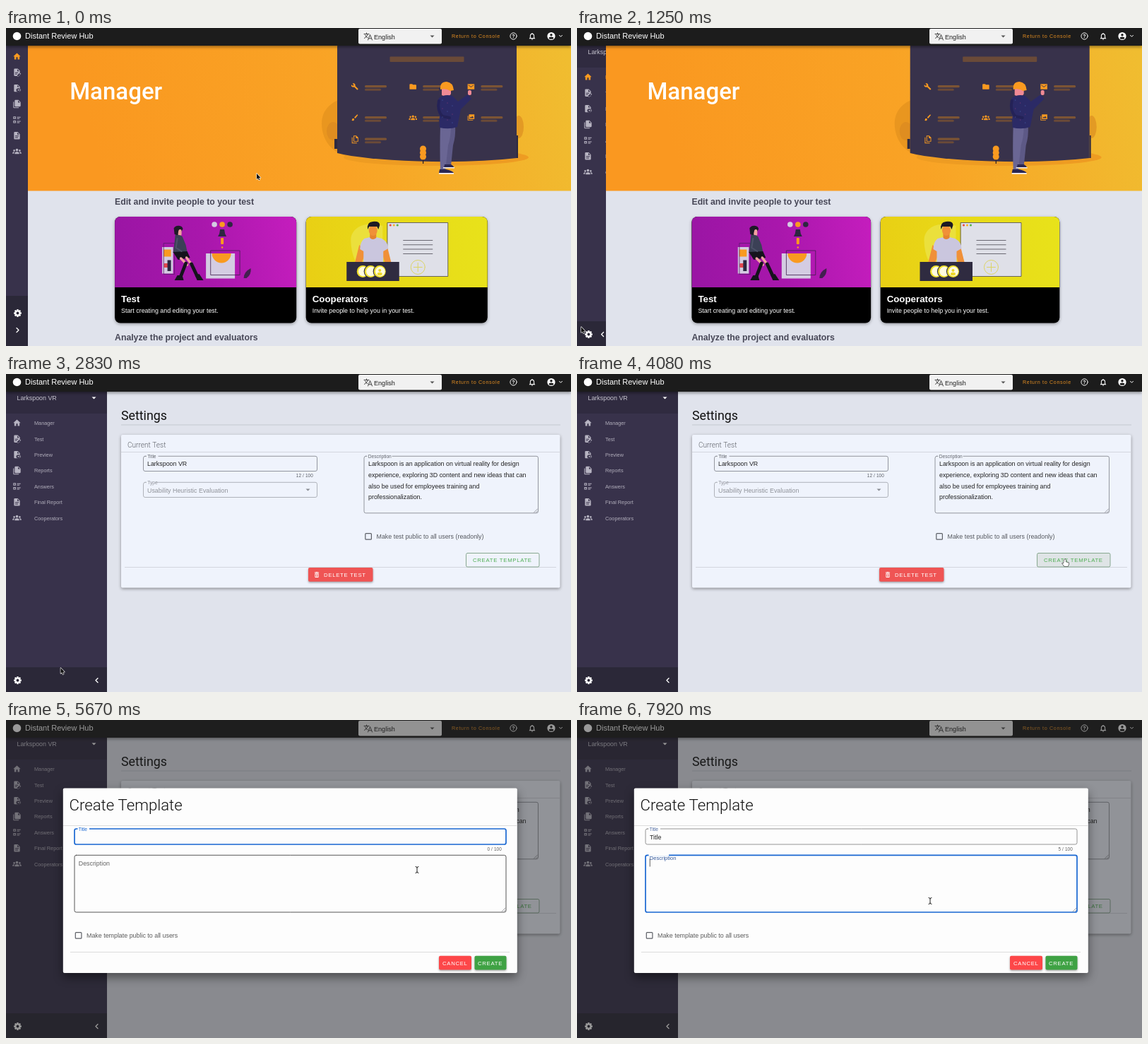
Recreate the animation shown at these times as an HTML page with a canvas. Size 800 by 450 pixels, loop 8 s.

```html
<!DOCTYPE html>
<html lang="en">
<head>
<meta charset="utf-8">
<title>Test manager walkthrough</title>
<style>
html, body { margin: 0; width: 100%; height: 100%; overflow: hidden; background: #e0e3ec; }
canvas { display: block; width: 800px; height: 450px; }
</style>
</head>
<body>
<canvas id="stage"></canvas>
<script>
const LOOP = 8000, STEP = 1000 / 12;
const SANS = '"Liberation Sans", Arial, sans-serif', ROBOTO = 'Roboto, sans-serif';
const ORANGE = '#f99a20', DARK = '#38324b', BLUE = '#1967d2', GREEN = '#3fa244';
const PRODUCT = 'Larkspoon VR';

const canvas = document.getElementById('stage');
const ctx = canvas.getContext('2d');
const dpr = window.devicePixelRatio || 1;
canvas.width = 800 * dpr;
canvas.height = 450 * dpr;

// ---------- helpers ----------
const clamp = v => Math.max(0, Math.min(1, v));
const mix = (a, b, p) => a + (b - a) * p;

function bezier(x1, y1, x2, y2) {
  const curve = (a, b, s) => 3 * (1 - s) * (1 - s) * s * a + 3 * (1 - s) * s * s * b + s * s * s;
  return u => {
    u = clamp(u);
    let lo = 0, hi = 1;
    for (let i = 0; i < 24; i++) {
      const mid = (lo + hi) / 2;
      if (curve(x1, x2, mid) < u) lo = mid; else hi = mid;
    }
    return curve(y1, y2, hi);
  };
}
const standard = bezier(.4, 0, .2, 1), swing = bezier(.25, .8, .5, 1), inOut = bezier(.42, 0, .58, 1);

function text(s, x, y, size, color, o = {}) {
  ctx.font = `${o.weight || 400} ${size}px ${o.font || SANS}`;
  ctx.letterSpacing = (o.space || 0) + 'px';
  ctx.textAlign = o.align || 'left';
  ctx.fillStyle = color;
  ctx.fillText(s, x, y + size * .355);
}
function box(x, y, w, h, color, r = 0) {
  ctx.fillStyle = color;
  ctx.beginPath();
  ctx.roundRect(x, y, w, h, r);
  ctx.fill();
}
function frame(x, y, w, h, color, lw = 1, r = 0) {
  ctx.strokeStyle = color;
  ctx.lineWidth = lw;
  ctx.beginPath();
  ctx.roundRect(x, y, w, h, r);
  ctx.stroke();
}
function disc(x, y, r, color, ry = r) {
  ctx.fillStyle = color;
  ctx.beginPath();
  ctx.ellipse(x, y, r, ry, 0, 0, 7);
  ctx.fill();
}
function ring(x, y, r, color, lw = 1) {
  ctx.strokeStyle = color;
  ctx.lineWidth = lw;
  ctx.beginPath();
  ctx.arc(x, y, r, 0, 7);
  ctx.stroke();
}
function shape(d, color) {
  ctx.fillStyle = color;
  ctx.fill(new Path2D(d), 'evenodd');
}
function stroke(d, color, lw = 1) {
  ctx.strokeStyle = color;
  ctx.lineWidth = lw;
  ctx.lineCap = ctx.lineJoin = 'round';
  ctx.stroke(new Path2D(d));
}
function group(fn) { ctx.save(); fn(); ctx.restore(); }
function shadow(color, blur, dy) {
  ctx.shadowColor = color;
  ctx.shadowBlur = blur * dpr;
  ctx.shadowOffsetY = dy * dpr;
}
function gradient(x1, y1, x2, y2, ...colors) {
  const g = ctx.createLinearGradient(x1, y1, x2, y2);
  colors.forEach((c, i) => g.addColorStop(i / (colors.length - 1), c));
  return g;
}

// ---------- icons on a 24 unit grid ----------
const SHEET = 'M6 2h8l6 6v12a2 2 0 0 1-2 2H6a2 2 0 0 1-2-2V4a2 2 0 0 1 2-2zM13 3.5V9h5.5z';
const ICONS = {
  home: 'M10 20v-6h4v6h5v-8h3L12 3 2 12h3v8z',
  edit: SHEET + 'M7 12h8v2H7zM7 16h5v2H7zM13 20l7-7 3 3-7 7h-3z',
  eye: SHEET + 'M10 17a5 4 0 0 1 12 0a5 4 0 0 1-12 0zM14 17a2 2 0 0 1 4 0a2 2 0 0 1-4 0z',
  stack: 'M8 1h8l6 6v10a2 2 0 0 1-2 2H8a2 2 0 0 1-2-2V3a2 2 0 0 1 2-2zM15 2.500V8h5.500zM2 6h2v15h13v2H4a2 2 0 0 1-2-2z',
  copies: 'M8 1h8l6 6v12H8zM10 3v14h10V9h-5V3zM3 6h2v16h13v2H3z',
  list: 'M2 3h7v7H2zM4 5v3h3V5zM2 14h7v7H2zM4 16v3h3v-3zM12 4h10v2H12zM12 8h7v2h-7zM12 15h10v2H12zM12 19h7v2h-7z',
  doc: SHEET + 'M7 12h10v2H7zM7 16h8v2H7z',
  people: 'M8.500 8a3.500 3.500 0 0 1 7 0a3.500 3.500 0 0 1-7 0zM6 19v-2c0-5 12-5 12 0v2zM2 9.500a2.500 2.500 0 0 1 5 0a2.500 2.500 0 0 1-5 0zM17 9.500a2.500 2.500 0 0 1 5 0a2.500 2.500 0 0 1-5 0zM0 18v-2c0-2 2-3 5-3q-1 1-1 5zM24 18v-2c0-2-2-3-5-3q1 1 1 5z',
  folder: 'M2 6a2 2 0 0 1 2-2h6l2 2h8a2 2 0 0 1 2 2v10a2 2 0 0 1-2 2H4a2 2 0 0 1-2-2z',
  mail: 'M2 4h20v16H2zM4 6l8 6 8-6v2l-8 6-8-6z',
  wrench: 'M22 19l-9-9c1-3 0-5-2-7-2-1-4-1-6 0l4 4-3 3-4-4c-1 2-1 4 1 6 2 2 4 2 7 1l9 9z',
  brush: 'M7 14c-2 0-3 1-3 3 0 1-1 2-2 2 3 3 8 2 8-2 0-2-1-3-3-3zM21 4l-2-2-9 9 3 3z',
  images: 'M6 2h16v14H6zM8 13h12l-4-6-3 4-2-2zM2 6h2v12h14v2H2z',
  bin: 'M6 8h12v11a2 2 0 0 1-2 2H8a2 2 0 0 1-2-2zM8 10v9h8v-9zM10 11h1.500v7H10zM13 11h1.500v7H13zM5 4h4l1-1h4l1 1h4v2H5z',
  bell: 'M10 20h4a2 2 0 0 1-4 0zM4 19v-1l2-2v-5c0-3 2-6 5-6V4q1-2 2 0v1c3 0 5 3 5 6v5l2 2v1zM8 17h8v-6c0-5-8-5-8 0z'
};
function icon(name, x, y, color, size = 12.5) {
  group(() => {
    ctx.translate(x - size / 2, y - size / 2);
    ctx.scale(size / 24, size / 24);
    shape(ICONS[name], color);
  });
}
function gear(x, y) {
  group(() => {
    ctx.translate(x, y);
    ring(0, 0, 3.1, '#fff', 2.3);
    for (let i = 0; i < 8; i++) {
      ctx.rotate(Math.PI / 4);
      box(-1.2, -5.4, 2.4, 2.2, '#fff', .4);
    }
  });
}
function caretDown(x, y, color) { shape(`M${x - 3} ${y - 1.5}h6l-3 3z`, color); }
function chevron(x, y, dir, color = '#fff') {
  stroke(`M${x - 1.5 * dir} ${y - 3}l${3 * dir} 3l${-3 * dir} 3`, color, 1.3);
}
function checkbox(x, y) { frame(x + .8, y + .8, 8.6, 8.6, '#5c5f66', 1.2, 1); }

// ---------- chrome ----------
function appBar() {
  group(() => {
    shadow('rgba(0,0,0,.4)', 4, 2);
    box(0, 0, 800, 25, '#1c1c1c');
  });
  disc(15.500, 11.500, 5.8, '#fff');
  text('Distant Review Hub', 27, 11.500, 11, '#fff');
  box(499, 1, 118, 21.500, '#f1f1f1', 2);
  stroke('M507 8.500h7M510.500 7v1.500M512.500 8.500q-1 4-5 6M508.500 10q1.500 3 3.500 4M512.500 17l3-7.500 3 7.500M513.500 14.800h4', '#444', 1);
  text('English', 521, 12.500, 9.1, '#222');
  caretDown(603.500, 12, '#555');
  text('Return to Console', 631, 11.500, 7.2, '#e08c22', { space: .64 });
  ring(718.500, 11.500, 4.6, '#fff', 1);
  text('?', 718.500, 11.500, 7, '#fff', { align: 'center', weight: 700 });
  icon('bell', 745, 11.500, '#fff');
  disc(772, 11.500, 5.6, '#fff');
  disc(772, 9.700, 1.7, '#1c1c1c');
  disc(772, 14.200, 3.3, '#1c1c1c', 1.6);
  stroke('M783.500 10.300l2 2 2-2', '#fff', 1);
}
const MENU = [['home', 'Manager'], ['edit', 'Test'], ['eye', 'Preview'], ['stack', 'Reports'],
  ['list', 'Answers'], ['doc', 'Final Report'], ['people', 'Cooperators']];

function sidebar(width, open, onManager) {
  group(() => {
    ctx.beginPath();
    ctx.rect(0, 25, width, 425);
    ctx.clip();
    box(0, 25, width, 425, DARK);
    const footer = open ? 415 : 379;
    box(0, footer, width, 450 - footer, '#2b2838');
    if (open) {
      box(0, 25, width, 31, '#302b40');
      text(PRODUCT, 15.500, 34, 8.9, '#c6c4ce');
      caretDown(124.500, 34, '#fff');
    }
    MENU.forEach(([name, label], i) => {
      const y = (open ? 69.300 : 40.300) + 22.4 * i, active = onManager && i === 0;
      icon(name, 15.500, y, active ? ORANGE : '#b7b4c2');
      if (open) text(label, 40, y + .3, 7.3, active ? ORANGE : '#b1aebb');
    });
    gear(16.500, open ? 433.500 : 403.500);
    if (open) chevron(width - 14.500 + 10.500 * (1 - (width - 31) / 112), 433.500, -1);
    else chevron(16.500, 427.500, 1);
  });
}

// ---------- manager page ----------
function heroArt() {
  shape('M447 135c0-22 20-40 50-34v82c-30 0-50-20-50-48z', '#e9961f');
  disc(609, 183, 131, '#ee9c22', 12);
  disc(463, 146, 9, '#df8d20', 13);
  box(465, 157, 4, 14, '#2e2a40');
  disc(726, 140, 7, '#e39a24', 16);
  box(723, 152, 2, 32, '#2e2a40');
  shape('M469 27q0-6 6-6h242q6 0 6 6v157q-60 7-140 4.500-80-3-114-11.500z', DARK);
  box(543.500, 40.500, 105, 7.500, '#6a4a38', 1);
  const tools = ['wrench', 'folder', 'mail', 'brush', 'people', 'images', 'copies'];
  tools.forEach((name, i) => {
    const x = 494 + 82.2 * (i % 3), y = [83, 127, 157.500][Math.floor(i / 3)];
    icon(name, x, y, ORANGE, 11.5);
    box(x + 14, y - 2, 31, 3.300, '#7c5434', 1.5);
    box(x + 14, y + 2.700, 23, 3, '#6a4a38', 1.5);
  });
  box(590, 176, 1.200, 16, '#1f1b2c');
  for (let i = 0; i < 3; i++) disc(590.500, 171 + i * 5.5, 4.5, ORANGE);
  // person at the board
  shape('M620 138h16q1 15-3 28l-3 29h-7z', '#5d5986');
  shape('M615 138h15q0 16-4 28l-4 36h-7q-1-34 0-64z', '#6a6694');
  shape('M621 193h9q4 2 5 5h-15z', '#2a2752');
  box(619, 197, 16, 1.5, '#f3f1f8');
  shape('M614 200h9q9 2 11 5h-21z', '#2a2752');
  box(613, 205, 21, 1.8, '#f3f1f8');
  shape('M617 86h13v7q-2 5-8 4l-5-2z', '#f08a95');
  shape('M613 99q8-6 19-3l8 8 14-10 5 6-15 15-5 25q-11 4-25 1-1-14 1-23-6-9-2-19z', '#2b2a66');
  stroke('M613 103q-3 14 5 22l10 2', '#242257', 4);
  box(654, 88, 5, 7, '#f08a95', 2);
  shape('M615 87q-1-11 9-11 9 1 10 12l-5 1q-6-4-14-2z', ORANGE);
  for (let i = 0; i < 9; i++) disc(618 + (i * 7) % 21, 102 + i * 4, .6, i % 2 ? '#8e3a78' : '#4a64b0');
}
function testArt() {
  // coordinates relative to the card centre
  box(-61.500, 310, 15.500, 37.500, '#d4cce2');
  box(-59.500, 313.500, 10.500, 10, ORANGE);
  box(-59, 333, 6, 6, '#e2474f', 1);
  box(-54, 328.500, 5, 15.500, '#2c2740');
  frame(-59, 304.500, 15, 44, '#5b1a6e', .8);
  [['#d4cce2', 12.5], [ORANGE, 23.5], ['#2c2740', 34.5]].forEach(([c, x]) => disc(x, 278, 3.8, c));
  shape('M20.500 285h6l1 6 2 4h-12l2-4z', '#2c2740');
  box(21.500, 297, 4, 9, ORANGE, 1);
  disc(23.500, 310.500, 1.2, ORANGE);
  box(.5, 319, 41, 35.500, '#d4cce2');
  shape('M9 319h27a13.500 13.500 0 0 1-27 0z', ORANGE);
  frame(7.500, 315, 41, 34.500, '#41204f', .8);
  shape('M54 354q0-9 10-14 1 9-6 14z', '#43204f');
  shape('M-44 282q4-4 10-1 3 3 1 5l-3 5-2 4-5-3z', '#1e1a28');
  box(-39, 285, 5, 9, '#f2a2a0', 2);
  shape('M-45 283q5-5 11-1l-4 4-2 7-4-1z', '#1e1a28');
  shape('M-43 293q7-1 10 2l5 12 2 10-20 1q2-12 3-25z', '#3b4056');
  shape('M-46 317l20-1 4 9-17 3z', '#15131c');
  stroke('M-35 326l9 9M-27 325l9 12', '#f2a2a0', 3.5);
  stroke('M-28 333l-7 18M-20 334l8 17', '#15131c', 4.8);
  shape('M-40 350h7l2 7h-13zM-15 350l6-2 6 9h-9z', '#15131c');
  stroke('M-40 298l-2 13 8 5', '#4d5268', 2);
}
function teamArt() {
  shape('M-65 300c0-18 22-28 45-20v51h-38q-7-14-7-31z', '#ebe03c');
  box(-13, 275.500, 85.500, 76, '#dfe0e8');
  frame(-13, 275.500, 85.500, 76, '#4a4658', .8);
  ['#e8473f', '#f0b429', '#55b04c'].forEach((c, i) => disc(-9 + 5 * i, 279, 1.6, c));
  for (let i = 0; i < 4; i++) box(9, 300 + 6.3 * i, 42, 1, '#6a6872');
  ring(30, 338.500, 10, '#dcd465', 1);
  stroke('M24 338.500h12M30 332.500v12', '#dcd465', 1);
  shape('M-53 307l-6 24h10l6-16zM-14 307l6 24h-9l-5-16z', '#f09038');
  shape('M-46 298l8-2h9l8 2q9 5 9 14l-7 4v15h-28v-15l-5-3q0-10 6-15z', '#cac6de');
  shape('M-38 290h9v7q-5 4-9 0z', '#e5842e');
  disc(-33.500, 286.500, 6, '#f09038', 7.500);
  shape('M-41 285q-2-10 7-11 10-1 10 5l-2 6-2-4h-11z', '#1d1a24');
  box(-71, 331, 74.500, 27, '#2f2b40');
  [-48, -37, -24].forEach(x => {
    disc(x, 344.500, 9.6, '#2f2b40');
    disc(x, 344.500, 8.5, '#f0e02c');
    disc(x + .6, 344.500, 6.8, '#fffbe0');
  });
  disc(-24, 343, 2, '#efd92c');
  disc(-24, 348, 3.5, '#efd92c', 2.2);
}
function card(x, w, colors, art, title, note) {
  group(() => {
    shadow('rgba(0,0,0,.35)', 4, 1.5);
    box(x, 267, w, 150.500, '#000', 8);
  });
  group(() => {
    ctx.beginPath();
    ctx.roundRect(x, 267, w, 150.500, 8);
    ctx.clip();
    box(x, 267, w, 100, gradient(x, 330, x + w, 290, ...colors));
    ctx.translate(x + w / 2, 0);
    art();
  });
  text(title, x + 9, 383.500, 13.3, '#fff', { weight: 700 });
  text(note, x + 9, 400, 8.9, '#fff');
}
function managerPage(left) {
  const w = 800 - left;
  box(left, 25, w, 425, '#e0e3ec');
  group(() => {
    ctx.beginPath();
    ctx.rect(left, 25, w, 205.500);
    ctx.clip();
    box(left, 25, w, 206, gradient(left + w * .15, 240, 800, 60, '#fa9820', '#f9a325', '#f0bd30'));
    // the drawing stays centred in its column and shrinks once that gets narrow
    const scale = Math.min(1, w / 728);
    ctx.translate(609 + .27 * (left - 31), 91);
    ctx.scale(scale, scale);
    ctx.translate(-609, -91);
    heroArt();
  });
  text('Manager', left + .077 * w, 89.300, 33, '#fff', { weight: 500, font: ROBOTO });
  const x = left + .16 * w, cw = (800 - .1537 * w - x - 13.5) / 2;
  const heading = { weight: 700 };
  text('Edit and invite people to your test', x, 246, 12.27, '#474757', heading);
  card(x, cw, ['#9a15a4', '#a917ac', '#c41dbd'], testArt, 'Test', 'Start creating and editing your test.');
  card(x + cw + 13.5, cw, ['#e9cf14', '#e8da18', '#e8e21a'], teamArt, 'Cooperators', 'Invite people to help you in your test.');
  text('Analyze the project and evaluators', x, 438, 12.27, '#474757', heading);
}

// ---------- settings page ----------
function field(x, y, w, h, label, o) {
  const lw = o.focus ? 1.7 : .9;
  frame(x + .5, y + .5, w - 1, h - 1, o.line || '#8a8d94', lw, 2.5);
  if (!label) return;
  box(x + 5, y - 1, label.length * 3.1 + 1, 3, o.back);
  text(label, x + 6.300, y + 1, 6.6, o.color || '#63666d');
}
function grip(x, y) {
  stroke(`M${x - 5} ${y}l5-5M${x - 2} ${y}l2-2`, '#77797e', .7);
}
function button(x, y, w, label, back, color, tx) {
  group(() => {
    shadow('rgba(0,0,0,.35)', 3, 1.5);
    box(x, y, w, 19.800, back, 2);
  });
  text(label, tx, y + 10.200, 7.75, color, { space: .69 });
}
function settingsPage(t) {
  const back = '#eff3fc';
  box(143, 25, 657, 425, '#e0e3ec');
  text('Settings', 163, 58.500, 17.8, '#111', { font: ROBOTO });
  box(163, 71.500, 622, 1, '#c6c9d1');
  group(() => {
    shadow('rgba(0,0,0,.4)', 4, 1.5);
    box(163, 86, 621.500, 216.500, back, 2);
  });
  text('Current Test', 172, 100.500, 10.1, '#5d6067', { font: ROBOTO, weight: 300 });
  box(163, 110, 621.500, 1, '#d3d6de');
  field(194, 115.800, 247, 22.200, 'Title', { back });
  text(PRODUCT, 200, 127.200, 8.9, '#222');
  text('12 / 100', 435, 144, 6.4, '#5d6067', { align: 'right', space: .15 });
  field(194, 152.800, 247, 22.200, 'Type', { back, line: '#a9acb3', color: '#8f9299' });
  text('Usability Heuristic Evaluation', 200, 164.500, 8.9, '#8f9299');
  caretDown(427.500, 164, '#888b92');
  field(506.500, 115.800, 247.500, 81.500, 'Description', { back });
  ['Larkspoon is an application on virtual reality for design',
   'experience, exploring 3D content and new ideas that can',
   'also be used for employees training and',
   'professionalization.'].forEach((s, i) => text(s, 513, 127.200 + 15.6 * i, 8.9, '#222'));
  grip(752.500, 196);
  checkbox(508, 224.800);
  text('Make test public to all users (readonly)', 524.500, 230, 8.9, '#56595f');
  box(168, 273, 611, 1, '#d3d6de');
  if (t > 3650 && t < 4500) box(651, 253.500, 104, 19.500, '#dfe4e6', 2);
  if (t > 4120 && t < 4500) box(651, 253.500, 104, 19.500, 'rgba(76,175,80,.35)', 2);
  frame(651.500, 253.500, 103.500, 19.500, '#88a890', 1, 2);
  text('CREATE TEMPLATE', 661, 263.500, 7.75, '#4fae53', { space: .69 });
  button(428, 274, 91.500, 'DELETE TEST', '#ef5454', '#fff', 450);
  icon('bin', 440, 284, '#fff', 10.5);
}

// ---------- dialog ----------
const OPENED = 4117, TYPED = 6250, KEY_GAP = 165, MOVED_ON = 7840;

function dialog(t) {
  const p = swing((t - OPENED) / 300);
  const onTitle = t < MOVED_ON, float = swing((t - MOVED_ON) / 300);
  const typed = 'Title'.slice(0, Math.max(0, Math.floor((t - TYPED) / KEY_GAP) + 1));
  const typing = t >= TYPED && t < TYPED + 5 * KEY_GAP + 300;
  const caret = typing || Math.floor((t - (onTitle ? 4160 : MOVED_ON)) / 500) % 2 === 0;

  box(0, 0, 800, 450, `rgba(33,33,33,${.46 * clamp((t - OPENED) / 200)})`);
  group(() => {
    ctx.globalAlpha = p;
    ctx.translate(402.2, 227.2);
    ctx.scale(.5 + p / 2, .5 + p / 2);
    ctx.translate(-402.2, -227.2);
    group(() => {
      shadow('rgba(0,0,0,.45)', 14, 6);
      box(80.800, 96.500, 643, 261.500, '#fdfdfd', 2);
    });
    text('Create Template', 89.500, 120.500, 22.2, '#111', { font: ROBOTO, weight: 300 });
    box(81, 149, 643, 1, '#dcdcdc');
    const back = '#fdfdfd';
    field(96.500, 153.500, 612, 23, 'Title', {
      back, focus: onTitle, line: onTitle ? BLUE : '#8a8a8a', color: onTitle ? BLUE : '#4c69a0'
    });
    text(typed, 103, 165.500, 8.9, '#222');
    if (onTitle && caret) box(103 + (typed ? ctx.measureText(typed).width : 0), 160, .8, 11, '#333');
    text(typed.length + ' / 100', 702, 182.500, 6.4, '#5f5f5f', { align: 'right', space: .15 });

    const hover = t > 4700;
    field(96.500, 190.800, 612, 81.700, '', { focus: !onTitle, line: onTitle ? (hover ? '#444' : '#8a8a8a') : BLUE });
    if (!onTitle) box(101.500, 189.500, 36 * clamp(float * 1.3), 3, back);
    text('Description', 102.800, mix(202.500, 191.500, float), mix(8.85, 6.65, float), onTitle ? '#636363' : '#33589c');
    if (!onTitle && caret) box(102.800, 196.500, .8, 11, '#333');
    grip(707, 271);

    checkbox(97.500, 299.800);
    text('Make template public to all users', 114, 305, 8.9, '#5a5a5a');
    box(91, 328, 622, 1, '#dcdcdc');
    button(613, 333.700, 46, 'CANCEL', '#fd4749', '#fff', 618);
    button(663.500, 333.700, 45, 'CREATE', GREEN, '#fff', 668);
  });
}

// ---------- pointer ----------
const PATH = [[0, 355, 206], [250, 355, 206], [1000, 15, 426], [1160, 15, 426], [1250, 6, 423], [1500, 6, 423],
  [1950, 21, 430], [2600, 21, 430], [3750, 691, 262], [4400, 691, 262], [5300, 582, 212],
  [7000, 582, 212], [7700, 500, 256], [LOOP, 500, 256]];
const KINDS = [[950, 'arrow'], [1200, 'hand'], [1880, 'arrow'], [2650, 'hand'], [3650, 'arrow'],
  [4150, 'hand'], [4650, 'arrow'], [LOOP + 1, 'beam']];

function pointer(t) {
  const i = PATH.findIndex((k, n) => n > 0 && t <= k[0]);
  const [t0, x0, y0] = PATH[i - 1], [t1, x1, y1] = PATH[i];
  const p = inOut((t - t0) / (t1 - t0));
  const kind = KINDS.find(k => t < k[0])[1];
  group(() => {
    ctx.translate(mix(x0, x1, p), mix(y0, y1, p));
    if (kind === 'beam') {
      stroke('M-2-4.500q2 0 2 1.500v6q0 1.500-2 1.500M2-4.500q-2 0-2 1.500M0 3q0 1.500 2 1.500', '#222', 1);
      return;
    }
    const d = kind === 'arrow'
      ? 'M0 0v8l1.800-1.600 1.300 2.900 1.300-.6-1.300-2.800h2.500z'
      : 'M-1 1q1-2 2 0v3l4 1q1 1 0 3l-1 2h-5l-3-4q0-1 2 0z';
    const [fill, edge] = kind === 'arrow' ? ['#111', '#fff'] : ['#fff', '#222'];
    stroke(d, edge, 1.2);
    shape(d, fill);
  });
}

// ---------- scene ----------
const EXPAND = 1216, SETTINGS = 2410;

function draw(t) {
  ctx.setTransform(dpr, 0, 0, dpr, 0, 0);
  ctx.clearRect(0, 0, 800, 450);
  const left = 31 + 112 * standard((t - EXPAND) / 200);
  const onManager = t < SETTINGS;
  if (onManager) managerPage(left); else settingsPage(t);
  sidebar(left, t >= EXPAND, onManager);
  appBar();
  if (t >= OPENED) dialog(t);
  pointer(t);
}

const start = performance.now();
function tick() {
  const t = (performance.now() - start) % LOOP;
  draw(Math.floor((t + 5) / STEP) * STEP % LOOP);
  requestAnimationFrame(tick);
}
tick();
</script>
</body>
</html>
```
